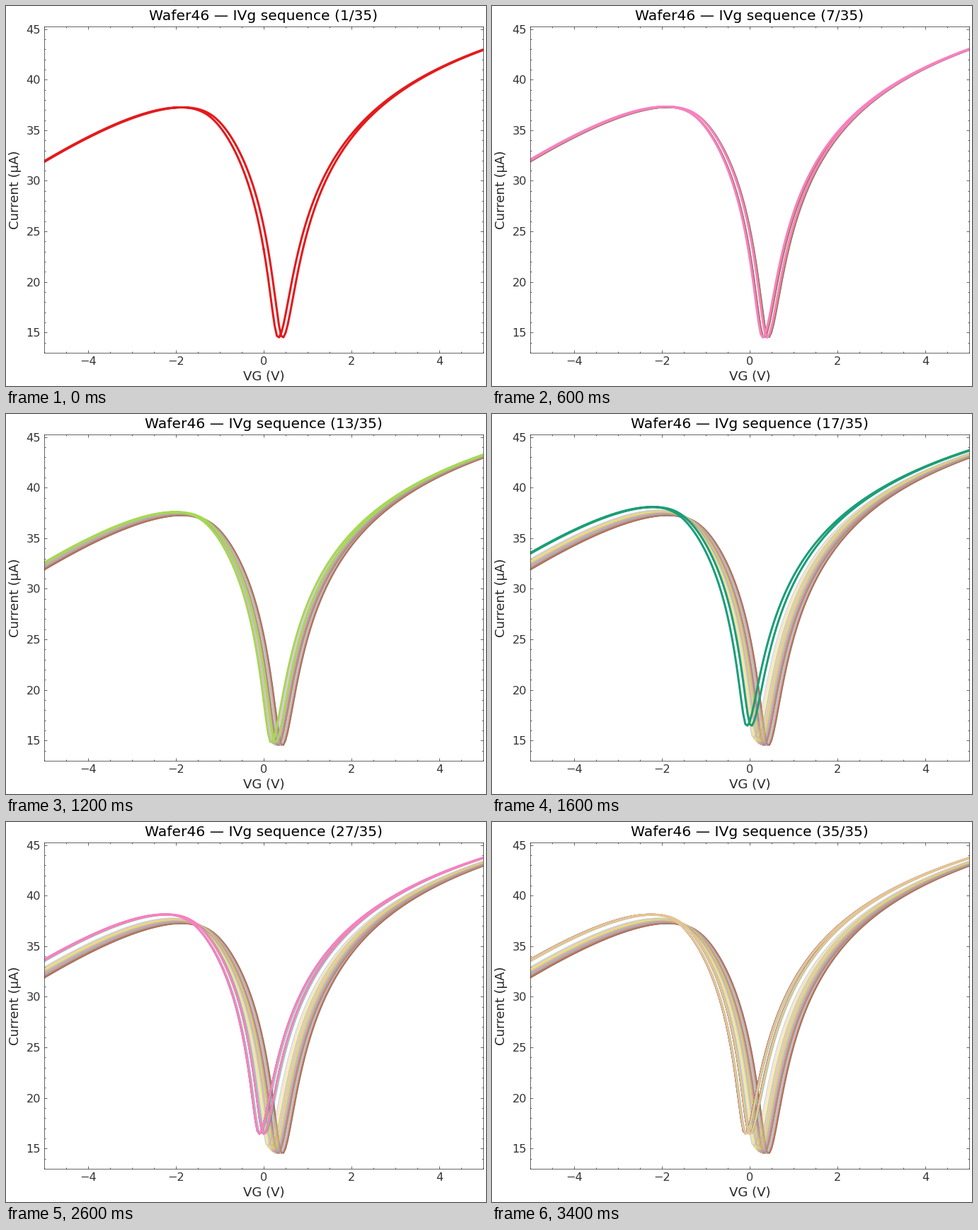
These frames come from a looping animation (678 px wide and 538 px high, 3.5 s). A matplotlib script:

```python
import numpy as np
import matplotlib.pyplot as plt
from matplotlib.animation import FuncAnimation
from matplotlib.ticker import MultipleLocator

W, H, DPI = 678, 538, 100
LEFT, RIGHT, TOP, BOTTOM = 54, 674, 28.8, 490.8
SWEEPS = 35
DEVICE = "Wafer46"

# Set1 without yellow, Set2, then the first half of Dark2
set1 = [c for i, c in enumerate(plt.get_cmap("Set1").colors) if i != 5]
COLORS = set1 + list(plt.get_cmap("Set2").colors) + list(plt.get_cmap("Dark2").colors[:4])


def drift(n):
    """Doping drift: slow growth, a jump at sweep 17, then nearly settled."""
    if n < 17:
        return .62 * (max(n - 3, 0) / 13) ** 1.6
    return 1 + .13 * (1 - np.exp(17 - n)) - .004 * (n - 17)


def current(v, p):
    """Ambipolar transfer curve in µA at gate voltage v and drift p."""
    u = v - (.38 - .4 * p)                      # distance from the neutral point
    residue = .092 + .036 * min(p, 1) ** 2.2    # sets the height of the dip
    round_off = .3 - .05 * p
    gain = np.where(u < 0, 1.42 + .12 * p, 1)   # holes respond faster
    carriers = residue + np.hypot(gain * u, round_off) - round_off
    hole_limit = -u - 1.54
    loss = 1.89 * (hole_limit + np.hypot(hole_limit, .42))
    return 1 / (.01564 + .01604 / np.sqrt(carriers)) - loss


def sweep(n):
    """Gate path 0 -> -5 -> 5 -> 0; the two directions lag to opposite sides."""
    down, up, back = np.linspace(0, -5, 101), np.linspace(-5, 5, 201), np.linspace(5, 0, 101)
    v = np.concatenate([down, up, back])
    side = np.repeat([-1, 1, -1], [101, 201, 101])
    lag = .015 + .035 * np.exp(-(v / 2.6) ** 2)
    return v, current(v - side * lag, drift(n))


fig = plt.figure(figsize=(W / DPI, H / DPI), dpi=DPI, facecolor="white")
ax = fig.add_axes([LEFT / W, 1 - BOTTOM / H, (RIGHT - LEFT) / W, (BOTTOM - TOP) / H])
ax.set(xlim=(-5, 5), ylim=(13.01, 45.27))
for axis, major, minor in ((ax.xaxis, 2, .5), (ax.yaxis, 5, 1)):
    axis.set_major_locator(MultipleLocator(major))
    axis.set_minor_locator(MultipleLocator(minor))
ax.tick_params(which="both", direction="in", top=True, right=True, width=.5, color="#262626")
ax.tick_params(which="major", length=3, pad=3.5, labelsize=11.6, labelcolor="#333333")
ax.tick_params(which="minor", length=1.5)
for spine in ax.spines.values():
    spine.set(linewidth=.5, color="#262626")


def label(x, y, text, size, **style):
    return fig.text(x / W, 1 - y / H, text, fontsize=size, ha="center",
                    va="baseline", **style)


title = label(364, 20, "", 14.6, color="black")
label(364, 530, "VG (V)", 13.1, color="#262626")
label(18, 259.8, "Current (µA)", 13.1, color="#262626", rotation=90,
      rotation_mode="anchor")

lines = [ax.plot(*sweep(n), color=COLORS[(n - 1) % len(COLORS)],
                 solid_capstyle="round", solid_joinstyle="round")[0]
         for n in range(1, SWEEPS + 1)]


def update(k):
    for i, line in enumerate(lines):
        line.set_visible(i <= k)
        line.set_linewidth(2.2 if i == k else 1.2)
        line.set_alpha(1 if i == k else .5)
    title.set_text(f"{DEVICE} — IVg sequence ({k + 1}/{SWEEPS})")
    return [*lines, title]


anim = FuncAnimation(fig, update, frames=SWEEPS, init_func=lambda: update(0),
                     interval=100, repeat=True, repeat_delay=0, blit=False)
plt.show()
```
